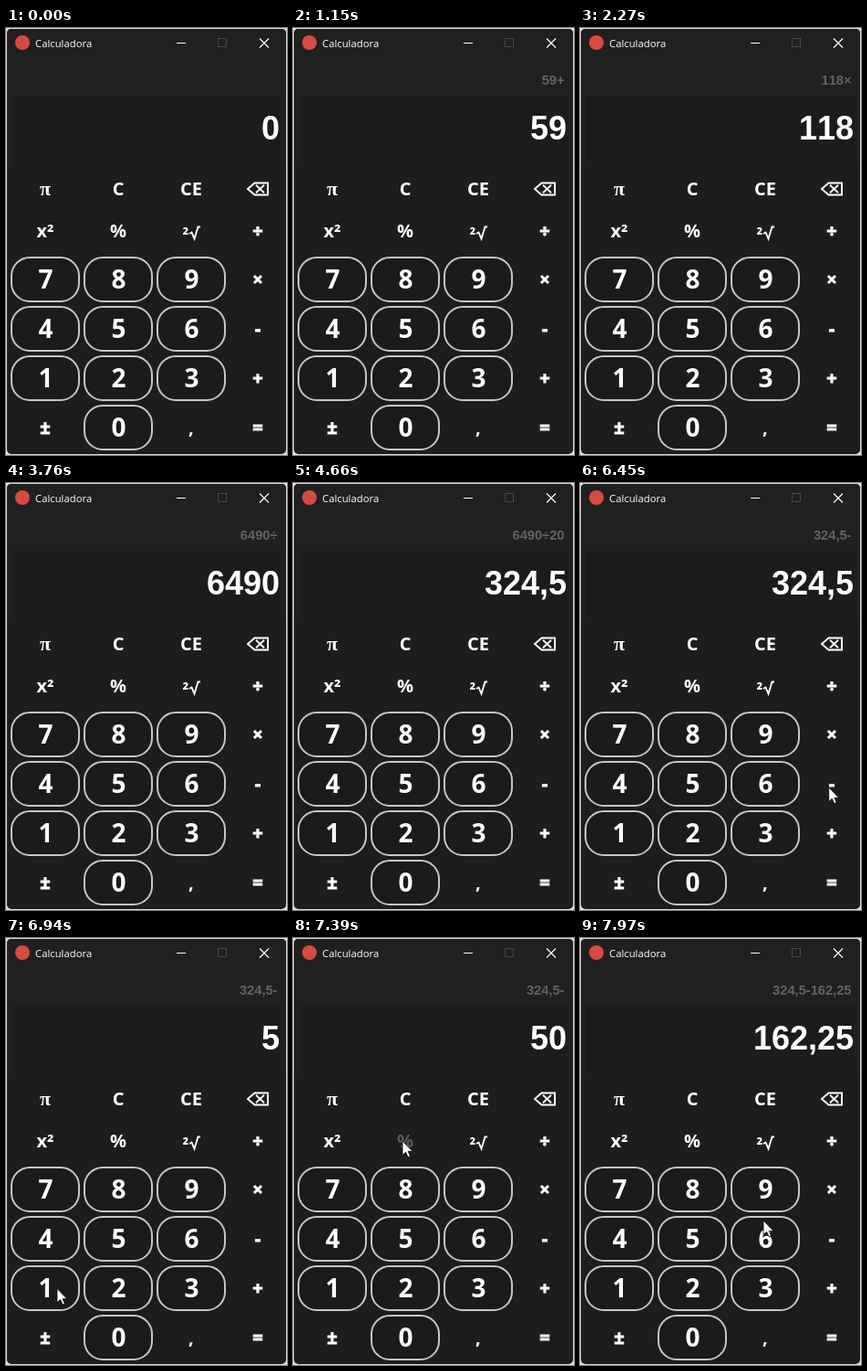
These frames come from a looping animation (308 px wide and 467 px high, 7990 ms). An HTML page:

```html
<!DOCTYPE html>
<html lang="pt">
<head>
<meta charset="utf-8">
<title>Calculadora</title>
<style>
  html, body { margin: 0; width: 100%; height: 100%; overflow: hidden; background: #e6dadd; }
  svg { display: block; width: 308px; height: 467px; }
  text { fill: #fff; font-family: "Open Sans", "Noto Sans", sans-serif; font-kerning: none; }
  .key { font-size: 20px; font-weight: 700; text-anchor: middle; }
  .digit { font-size: 28px; }
  .sign { stroke: #fff; stroke-width: .9; }
  .greek { font: 700 22px "Liberation Serif", "Noto Serif", serif; }
  .pressed { fill: #5a5a5a; stroke: none; }
  .title { font-size: 11.3px; }
  .readout { font: 700 36px "Liberation Sans", Arial, sans-serif; font-kerning: none; text-anchor: end; }
  .history { font: 700 14.67px "Liberation Sans", Arial, sans-serif; font-kerning: none; text-anchor: end; fill: #636363; }
  .pad { fill: #1b1b1b; stroke: #c6c6c6; stroke-width: 2; }
  .line { fill: none; stroke: #fff; stroke-width: 1.1; }
  .bold { stroke-width: 1.9; }
  .faint { stroke: #474747; stroke-width: 1; }
</style>
</head>
<body>
<svg viewBox="0 0 308 467">
  <rect x="1" y="1" width="306" height="465" rx="5" fill="#1d1d1d"/>
  <path d="M1 150V6Q1 1 6 1H302Q307 1 307 6V150Z" fill="#202020"/>
  <rect x="7" y="74" width="294" height="75" fill="#1c1c1c"/>

  <circle cx="18" cy="16" r="8" fill="#d64b40"/>
  <text class="title" x="32" y="20.5">Calculadora</text>
  <path class="line" d="M187 16.5H197M278 11.5L288 21.5M288 11.5L278 21.5"/>
  <rect class="line faint" x="232.5" y="11.5" width="9" height="9"/>

  <text class="history" id="history" x="297.5" y="62"></text>
  <text class="readout" id="readout" x="300" y="122"></text>

  <g id="keys"></g>
  <path class="line bold" d="M265 176L272.5 169.5H287V182.5H272.5ZM274 171.8L283 180.2M283 171.8L274 180.2"/>
  <text class="key" x="197" y="231" style="font-size:18px">²</text>
  <path class="line bold" d="M201 225L203.5 223.5L206.5 230.5L210.5 217.5H213"/>

  <path id="cursor" fill="#fff" stroke="#000" stroke-width=".8"
        d="M0 0V15.5L3.6 12.2L6 17.7L8.5 16.6L6.1 11.3H11Z"/>
</svg>
<script>
const LOOP = 7990, PRESS = 70;
const $ = id => document.getElementById(id);
const cols = [43, 123, 203, 276];
const layout = ["π C CE", "x² % _ ÷", "7 8 9 ×", "4 5 6 -", "1 2 3 +", "± 0 , ="];
const keys = {};

function add(tag, attrs) {
  const node = document.createElementNS("http://www.w3.org/2000/svg", tag);
  for (const name in attrs) node.setAttribute(name, attrs[name]);
  return $("keys").appendChild(node);
}

function style(label) {
  if (/\d$/.test(label)) return "key digit";
  if (label === "π") return "key greek";
  return /[÷×+±=-]/.test(label) ? "key sign" : "key";
}

layout.forEach((line, r) => line.split(" ").forEach((label, c) => {
  if (label === "_") return;
  const digit = /^\d$/.test(label), x = cols[c];
  const y = r < 2 ? 176 + 46 * r : 167 + 54 * r;
  if (digit) add("rect", { class: "pad", x: x - 37, y: y - 24, width: 74, height: 48, rx: 20 });
  keys[label] = add("text", {
    class: style(label), x: x + (digit ? .6 : 0), y: y + (digit ? 10 : 7)
  });
  keys[label].textContent = label;
}));

// The sum is typed up to "=", then clicked.
const input = [..."59,+59×55÷20=-50%"];
const times = [440, 490, 960, 1150, 1530, 1610, 2270, 2930, 3010,
  3760, 4170, 4280, 4660, 6430, 6720, 7120, 7450];
const firstClick = input.indexOf("=") + 1;

const ops = { "+": (a, b) => a + b, "-": (a, b) => a - b, "×": (a, b) => a * b, "÷": (a, b) => a / b };
const parse = s => parseFloat(s.replace(",", "."));
const format = n => String(n).replace(".", ",");

function press(state, key) {
  let { value, history, acc, op, fresh } = state;
  const result = () => format(op ? ops[op](acc, parse(value)) : parse(value));
  if (/\d/.test(key)) return { ...state, value: fresh ? key : value + key, fresh: false };
  if (key === ",") return { ...state, value: value + "," };
  if (key === "%") {
    value = format(acc * parse(value) / 100);
    return { ...state, value, history: history + value };
  }
  if (key === "=") return { value: result(), history: history + value, op: "", fresh: true };
  value = result();
  return { value, history: value + key, acc: parse(value), op: key, fresh: true };
}

const start = { value: "0", history: "", op: "", fresh: true };

// Pointer stops: [arrival, x, y, rest]
const stops = [
  [5270, 142, 279, 0], [5470, 268, 451, 0], [5620, 278, 321, 290], [5990, 274, 333, 450],
  [6640, 125, 332, 100], [6940, 56, 383, 0], [7060, 115, 438, 80], [7360, 120, 222, 240],
  [7930, 146, 296, 0], [7970, 201, 309, 0]
];

// Velocity at a stop: zero at rests and at both ends.
function slope(i, axis) {
  const a = stops[i - 1], b = stops[i], c = stops[i + 1];
  return !a || !c || b[3] ? 0 : (c[axis] - a[axis]) / (c[0] - a[0] - a[3]);
}

function along(t, axis) {
  const i = Math.min(stops.filter(s => s[0] <= t).length, stops.length - 1) - 1;
  const a = stops[i], b = stops[i + 1], leave = a[0] + a[3], span = b[0] - leave;
  const u = Math.min(1, Math.max(0, (t - leave) / span)), v = 1 - u;
  return v * v * (1 + 2 * u) * a[axis] + u * u * (1 + 2 * v) * b[axis]
    + span * u * v * (v * slope(i, axis) - u * slope(i + 1, axis));
}

function draw() {
  const t = performance.now() % LOOP;
  const state = input.filter((_, i) => times[i] <= t).reduce(press, start);
  $("readout").textContent = state.value;
  $("history").textContent = state.history;

  for (let i = firstClick; i < input.length; i++)
    keys[input[i]].classList.toggle("pressed", t >= times[i] - PRESS && t < times[i]);

  const shown = t >= stops[0][0];
  $("cursor").style.display = shown ? "" : "none";
  if (shown) $("cursor").setAttribute("transform", `translate(${along(t, 1)} ${along(t, 2)})`);
  requestAnimationFrame(draw);
}
draw();
</script>
</body>
</html>
```
